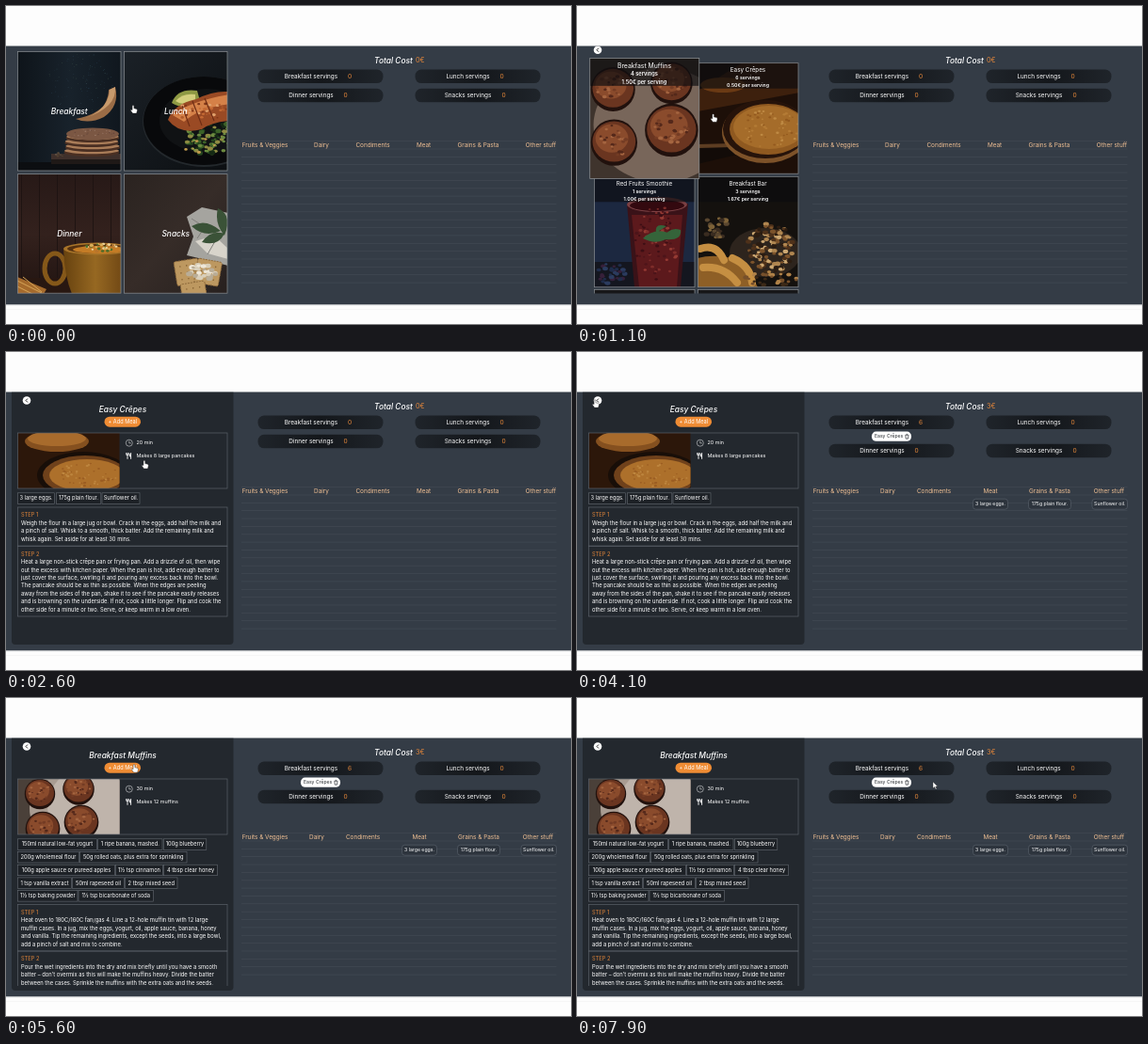
Write an HTML page that moves like this. It is 600 px wide and 338 px high and loops after 8 s.

```html
<!DOCTYPE html>
<html lang="en">
<head>
<meta charset="utf-8">
<title>Meal planner</title>
<style>
html, body { margin: 0; width: 100%; height: 100%; overflow: hidden; background: #fdfdfd; }
#stage { display: block; width: 100vw; height: 100vh; font-family: Inter, "Open Sans", sans-serif; }
</style>
</head>
<body>
<svg id="stage" viewBox="0 0 600 338"></svg>
<script>
const LOOP = 8000;
const ORANGE = '#e5873a';
const TAN = '#efbf93';

// Drawing helpers
const rect = (x, y, w, h, fill, more = '') =>
  `<rect x="${x}" y="${y}" width="${w}" height="${h}" fill="${fill}" ${more}/>`;
const oval = (x, y, rx, ry, fill, more = '') =>
  `<ellipse cx="${x}" cy="${y}" rx="${rx}" ry="${ry}" fill="${fill}" ${more}/>`;
const path = (d, fill, more = '') => `<path d="${d}" fill="${fill}" ${more}/>`;
const group = (id, body, more = '') => `<g id="${id}" ${more}>${body}</g>`;
const text = (s, x, y, size, fill = '#fff', more = 'text-anchor="middle"') =>
  `<text x="${x}" y="${y + size * 0.34}" font-size="${size}" fill="${fill}" ${more}>${s.replace('&', '&amp;')}</text>`;
const startText = (s, x, y, size, fill) => text(s, x, y, size, fill, '');
const title = (s, x, y) => text(s, x, y, 8.4, '#fff', 'text-anchor="middle" font-style="italic" font-weight="500"');
const frame = (x, y, w, h, color = '#5a6068') =>
  rect(x, y, w, h, 'none', `stroke="${color}" stroke-width=".7"`);
const photo = (x, y, w, h, body) =>
  `<svg x="${x}" y="${y}" width="${w}" height="${h}" viewBox="${x} ${y} ${w} ${h}">${body}</svg>`;
const gradient = (id, stops, x2 = 1, y2 = 0) =>
  `<linearGradient id="${id}" x2="${x2}" y2="${y2}">${stops.map((c, i) =>
    `<stop offset="${i / (stops.length - 1)}" stop-color="${c}"/>`).join('')}</linearGradient>`;

let seed = 7;
const random = () => (seed = (seed * 16807) % 2147483647) / 2147483647;
function scatter(n, x, y, rx, ry, size, colors) {
  let out = '';
  for (let i = 0; i < n; i++) {
    const a = random() * 6.283, d = Math.sqrt(random());
    const s = size * (0.6 + random() * 0.6);
    out += oval((x + Math.cos(a) * d * rx).toFixed(1), (y + Math.sin(a) * d * ry).toFixed(1),
      s.toFixed(2), (s * 0.75).toFixed(2), colors[i % colors.length]);
  }
  return out;
}

// Food pictures
function pancakes() {
  let s = rect(12, 48, 111, 128, 'url(#night)') +
    scatter(110, 78, 82, 36, 34, 0.35, ['#31506a', '#3c6272', '#4d6553']) +
    path('M116 86Q121 106 104 118Q88 126 74 120Q98 115 105 104Q109 96 109 89Z', '#9a6c46') +
    path('M116 86Q118 108 84 119Q101 113 107 101Q110 95 110 89Z', '#c89a6c') +
    rect(12, 166, 111, 10, '#0c0e11') + rect(48, 157, 75, 9, '#3f302b') + rect(48, 163, 75, 5, '#1f1917');
  for (let i = 0; i < 4; i++)
    s += oval(91 + i % 2, 155.5 - i * 5, 29.5 - i * 0.4, 4.6, '#4a2f22') + oval(91 + i % 2, 153.8 - i * 5, 29 - i * 0.4, 3.4, '#a97c58');
  return s + oval(92, 136, 28, 6.6, '#7b5743') + scatter(26, 92, 135, 23, 4, 0.8, ['#977765', '#66463a']) +
    scatter(8, 57, 158, 6, 2, 1.2, ['#51402f', '#5f4f42']);
}
function salmon() {
  return rect(125, 48, 111, 128, 'url(#slate)') +
    oval(210, 123, 65, 48, '#23282c') + oval(210, 122, 64, 47, '#08090b') + oval(213, 122, 50, 34, '#101214') +
    path('M176 103Q182 87 203 90L206 101Q190 112 176 103Z', '#8f9a44') +
    path('M180 101Q188 92 201 94L201 101Q188 107 180 101Z', '#d3cf7c') +
    scatter(100, 216, 138, 27, 20, 2.6, ['#24441f', '#3b6128', '#152a14', '#6c8a40', '#8f8a42']) +
    path('M172 121Q178 104 202 99Q228 86 250 94L250 122Q222 121 208 131Q184 137 172 121Z', '#9a4a24') +
    path('M177 116Q195 101 238 94L238 104Q205 108 189 123Z', '#d58148') +
    scatter(40, 208, 113, 28, 11, 1.8, ['#c56a34', '#7f3517', '#e0a06a', '#b05a2b']) +
    path('M187 106l8 22M198 101l10 26M211 98l10 24', 'none', 'stroke="#6f2d15" stroke-width="1.2"') +
    scatter(16, 205, 148, 18, 8, 1.6, ['#c09a4c', '#6d9040']);
}
function soup() {
  let s = rect(12, 179, 111, 127, 'url(#wood)');
  for (let i = 0; i < 6; i++) s += rect(16 + i * 19, 179, 0.9, 127, '#1e1412');
  return s + rect(12, 289, 111, 18, '#281711') + path('M12 288L43 301L40 306H12Z', '#a56a2c') +
    path('M12 292l26 13M12 298l16 8M18 288l20 16', 'none', 'stroke="#d6a558"') +
    oval(52, 279, 11, 16, 'none', 'stroke="#855819" stroke-width="5"') +
    path('M61 258L129 258L125 306H70Q62 287 61 258Z', 'url(#mug)') +
    oval(97, 258, 36, 6.5, '#a87429') + oval(98, 258, 33, 5, '#54300f') + oval(100, 259, 29, 4, '#c47c26') +
    scatter(34, 103, 257, 20, 4.5, 1.9, ['#d8ae5a', '#4c6c29', '#ead39a', '#b9752b']);
}
function cracker(x, y, turn) {
  let dots = '';
  for (let i = 0; i < 9; i++) dots += oval(6 + i % 3 * 7, 6 + Math.floor(i / 3) * 7, 0.8, 0.8, '#8a6636');
  return `<g transform="translate(${x} ${y}) rotate(${turn})">${rect(0, 0, 26, 26, '#bd9860',
    'rx="2" stroke="#8f6b3c" stroke-dasharray="2 1"')}${dots}</g>`;
}
function snack() {
  return rect(125, 179, 111, 127, 'url(#cocoa)') +
    path('M192 224L208 214L236 220V276L213 270L192 265L199 245Z', '#a5a49f') +
    path('M201 250L221 244L236 258V269L214 263Z', '#d8d4cb') +
    path('M197 226l14 9-8 12M222 250l-8 14', 'none', 'stroke="#7f7e7a"') +
    path('M197 234Q212 225 228 239Q211 247 197 234ZM225 215Q241 222 232 244Q221 231 225 215ZM208 251Q218 237 232 242Q225 256 208 251Z', '#3a5237') +
    cracker(178, 272, -9) + cracker(204, 268, 10) + cracker(185, 296, -9) +
    scatter(30, 208, 283, 15, 8, 3, ['#d9cfba', '#eee7d8', '#b9ad97']);
}
const muffin = (x, y, r) => oval(x, y + 1, r * 1.08, r * 1.08, '#21110d') + oval(x, y, r, r * 0.94, '#6a3520') +
  oval(x - r * 0.1, y - r * 0.15, r * 0.76, r * 0.66, '#8a4b2c') +
  scatter(26, x, y, r * 0.8, r * 0.75, r * 0.09, ['#54281a', '#a56540', '#743c24']);
const muffinCard = () => rect(18, 60, 107, 120, '#3f342d') + oval(88, 126, 66, 56, '#78665a') +
  muffin(41, 90, 20) + muffin(98, 84, 19) + muffin(42, 142, 21) + muffin(98, 130, 24);
const crepeCard = () => rect(128, 60, 108, 120, '#1d0f08') + path('M128 90L176 60H236V92L128 112Z', '#3d200d') +
  oval(155, 84, 24, 8, '#6b3a14') +
  path('M128 147L166 146L174 156L128 164Z', '#5d3d22') + path('M128 151L166 150L170 158L128 168Z', '#120b08') +
  oval(200, 134, 46, 33, '#7d5229') + oval(200, 131, 45, 31, '#26130a') + oval(203, 131, 41, 27, '#8f5920') +
  oval(204, 129, 38, 23, '#a56c2a') + scatter(60, 204, 130, 33, 20, 1.4, ['#b47b35', '#93591e', '#bf8a44']);
const smoothieCard = () => rect(18, 181, 107, 118, '#1c2840') + rect(18, 272, 107, 28, '#14161f') +
  path('M53 210H118L110 299H61Z', '#3a1218') + path('M58 222H112L106 299H66Z', '#5c191c') +
  oval(85, 211, 32, 8, '#7b4043') + oval(85, 212, 29, 6, '#33090f') +
  scatter(80, 85, 252, 23, 40, 1.8, ['#7f2d2a', '#3d0e14', '#953a33', '#4d1419']) +
  path('M70 247Q84 234 101 243Q87 256 70 247ZM92 248Q97 234 110 238Q112 250 92 248ZM84 241Q82 230 95 234Z', '#35643a') +
  scatter(30, 35, 284, 16, 12, 2.5, ['#1f2c4a', '#36203a', '#2b3b5e']);
const barCard = () => rect(128, 181, 108, 119, '#14110e') + oval(200, 262, 38, 26, '#2d241d') +
  scatter(24, 147, 236, 15, 12, 3, ['#3a2c20', '#59462f', '#7d6238']) +
  scatter(120, 206, 257, 25, 26, 2.6, ['#7c532b', '#b08650', '#4e311a', '#cda872', '#2b1c11']) +
  path('M128 268Q150 262 178 272L192 299H128Z', '#8e5f26') +
  path('M131 258Q148 252 156 270M134 278Q156 276 170 294M165 268Q184 276 186 294', 'none', 'stroke="#c58f42" stroke-width="8" stroke-linecap="round"') +
  scatter(30, 206, 290, 28, 8, 2.6, ['#77502b', '#b08248', '#3c2917']);
const muffinWide = () => rect(12, 86, 109, 60, '#4a4039') + oval(85, 117, 60, 55, '#a99c92') + oval(88, 116, 44, 43, '#bfb4ab') +
  muffin(36, 101, 15) + muffin(77, 96, 15.5) + muffin(39, 138, 17) + muffin(80, 131, 17);
const crepeWide = () => rect(12, 86, 109, 60, '#2c170a') + oval(54, 95, 34, 11, '#85501f') + oval(54, 92, 31, 8, '#a86b2c') +
  oval(82, 131, 49, 25, '#180e08') + oval(84, 131, 45, 21, '#6f411b') + oval(86, 131, 40, 17, '#ad702b') +
  scatter(55, 86, 131, 33, 13, 1.4, ['#be863f', '#9b5d22']);

// Left side
const homeCard = (id, name, x, y, art) => group(id,
  photo(x, y, 109.5, 126.5, art()) + frame(x, y, 109.5, 126.5, '#8b8f93') +
  title(name, x + 54.8, y + 63.3), 'class="card"');

function listCard(id, name, servings, price, x, y, art) {
  const mid = x + 53;
  const line = (s, dy) => text(s, mid, y + dy, 5.2, '#fff', 'text-anchor="middle" font-weight="600"');
  return group(id, photo(x, y, 106.5, 117.5, art()) + rect(x, y, 106.5, 27, '#0d0d10', 'opacity=".68"') +
    frame(x, y, 106.5, 117.5, '#8b8f93') + text(name, mid, y + 7.3, 6.3) +
    line(`${servings} servings`, 15.7) + line(`${price}€ per serving`, 23.5), 'class="card"');
}

const backButton = y => oval(22, y, 4.3, 4.3, '#fff') +
  path(`M23 ${y - 2}l-2 2l2 2`, 'none', 'stroke="#222" stroke-width="1"');

const ingredient = y => ([label, x, w]) =>
  rect(x, y, w, 11.5, '#1d2126', 'stroke="#666c73" stroke-width=".6"') + text(label, x + w / 2, y + 5.7, 5.7);

function step(n, y, h, lines) {
  return frame(12.5, y, 222.5, h) + startText(`STEP ${n}`, 16, y + 8.4, 5.7, ORANGE) +
    lines.map((s, i) => startText(s, 16, y + 17 + i * 8.4, 5.8)).join('');
}

function recipe(id, name, art, minutes, makes, rows, steps) {
  const rowsHtml = rows.map((row, i) => row.map(ingredient(149.8 + i * 13.7)).join('')).join('');
  let y = 151.4 + rows.length * 13.6, stepsHtml = '';
  steps.forEach((lines, i) => {
    const h = 16 + lines.length * 8.4;
    stepsHtml += step(i + 1, y, h, lines);
    y += h;
  });
  return group(id, path('M6 42.5H241.5V307q0 4-4 4H10q-4 0-4-4Z', '#23282e') + backButton(51.5) + title(name, 124, 61.3) +
    rect(104.5, 68.7, 38.5, 11, '#ef8c34', 'rx="5.5"') + text('+ Add Meal', 123.8, 74.2, 5.6) +
    photo(12.5, 86, 108, 59, art()) + frame(12.5, 86, 222.5, 59) +
    oval(130.8, 96.7, 3.5, 3.5, 'none', 'stroke="#d5d7d9" stroke-width=".6"') +
    path('M130.8 94.5v2.4h2', 'none', 'stroke="#d5d7d9" stroke-width=".6"') +
    path('M129 107.2v6.6M127.8 107v2.4h2.4V107M132.6 113.8v-6.4q-1.4 1-1.2 3.6h1.2', 'none', 'stroke="#fff" stroke-width=".9"') +
    startText(`${minutes} min`, 138.5, 96.5, 5.4) + startText(makes, 138.5, 110.4, 5.4) +
    photo(6, 148, 236, 158, rowsHtml + stepsHtml));
}

// Right side
const pill = (label, n, x, y, labelX, numberX) => rect(x, y, 133, 14.5, 'url(#pill)', 'rx="6.5"') +
  text(label, labelX, y + 7.3, 6.4) + text(String(n), numberX, y + 7.3, 6.6, ORANGE);

const mealTag = ([name, x, w]) => rect(x, 84.6, w, 10.2, '#fff', 'rx="4.6"') + startText(name, x + 3, 89.7, 5.1, '#25292e') +
  path(`M${x + w - 6.6} 88.3h4M${x + w - 6.1} 88.7l.4 3.5h2.2l.4-3.5M${x + w - 5.3} 87.4h1.4`, 'none', 'stroke="#25292e" stroke-width=".7"');

const CATEGORIES = ['Fruits & Veggies', 'Dairy', 'Condiments', 'Meat', 'Grains & Pasta', 'Other stuff'];

function column([x, w, ...items]) {
  let y = 156.2;
  return items.map(item => {
    const lines = item.split('|'), h = 3 + lines.length * 8;
    const out = rect(x, y, w, h, '#2d343d', 'rx="3" stroke="#5d656f" stroke-width=".6"') +
      lines.map((s, i) => text(s, x + w / 2, y + 5.4 + i * 7.9, 5.2)).join('');
    y += h + 1.25;
    return out;
  }).join('');
}

function plan(id, cost, servings, tags, centers, columns) {
  const y2 = tags.length ? 97.7 : 87.8;
  return group(id, startText(cost + '€', 435, 57.5, 7.3, ORANGE) +
    pill('Breakfast servings', servings, 267.5, 67.6, 324, 365) + pill('Lunch servings', 0, 434.5, 67.6, 490.5, 526.5) +
    pill('Dinner servings', 0, 267.5, y2, 324, 360.5) + pill('Snacks servings', 0, 434.5, y2, 490.5, 528.5) +
    tags.map(mealTag).join('') + CATEGORIES.map((c, i) => text(c, centers[i], 147.9, 6.4, TAN)).join('') +
    columns.map(column).join(''));
}

let ruled = '';
for (let i = 0; i < 19; i++) ruled += rect(250, (143.3 + i * 8.36).toFixed(1), 334.5, 0.6, '#434b55');

const sliver = x => rect(x, 301.5, 106.5, 6, '#171719', 'stroke="#8b8f93" stroke-width=".7"');

document.getElementById('stage').innerHTML =
  '<defs>' + gradient('night', ['#0e141a', '#18222b', '#10171e']) + gradient('slate', ['#1b2127', '#0c0f12'], 1, 1) +
  gradient('wood', ['#271917', '#33211d', '#211411'], 0, 1) + gradient('mug', ['#67420f', '#966822', '#6a4212']) +
  gradient('cocoa', ['#2a2320', '#362c28', '#27201e'], 1, 1) + gradient('pill', ['#1f242a', '#14171b', '#1f242a']) +
  gradient('fade', ['#d5d7d9', '#fdfdfd'], 0, 1) + '</defs>' +
  rect(0, 0, 600, 338, '#fdfdfd') + rect(0, 42.5, 600, 275, '#343c46') + rect(0, 317.5, 600, 1.5, 'url(#fade)') +
  rect(0, 322, 600, 0.6, '#f1f1f2') + ruled + title('Total Cost', 411.5, 58.2) +
  plan('plan0', 0, 0, [], [275, 335, 389.5, 443.5, 501.5, 568], []) +
  plan('plan1', 3, 6, [['Easy Crêpes', 313, 42]], [275, 330, 379, 439, 502, 565],
    [[420.5, 37, '3 large eggs.'], [479.5, 45, '175g plain flour.'], [547, 37.5, 'Sunflower oil.']]) +
  plan('plan2', 9, 10, [['Easy Crêpes', 285, 42], ['Breakfast Muffins', 328.5, 54]], [280, 339, 398, 447, 495.5, 555.5], [
    [250.5, 57.5, '1 ripe banana,|mashed.', '100g blueberry'],
    [309.5, 59, '150ml natural low-fat|yogurt'],
    [370, 56.5, '100g apple sauce or|pureed apples', '1½ tsp cinnamon', '4 tbsp clear honey', '1 tsp vanilla extract'],
    [428, 38, '3 large|eggs.'],
    [468, 56, '175g plain flour.', '200g wholemeal|flour', '50g rolled oats, plus|extra for sprinkling'],
    [526, 58.5, 'Sunflower oil.', '50ml rapeseed oil', '2 tbsp mixed seed', '1½ tsp baking powder', '1½ tsp bicarbonate of|soda']
  ]) +
  photo(0, 42.5, 250, 275,
    group('home', homeCard('lunch', 'Lunch', 125.5, 48.5, salmon) + homeCard('dinner', 'Dinner', 12.5, 178.7, soup) +
      homeCard('snacks', 'Snacks', 125.5, 178.7, snack) + homeCard('breakfast', 'Breakfast', 12.5, 48.5, pancakes)) +
    group('list', backButton(46.7) + photo(0, 42, 250, 263.5, sliver(18.5) + sliver(128.5) +
      group('cards', listCard('smoothie', 'Red Fruits Smoothie', 1, '1.00', 18.5, 181.3, smoothieCard) +
        listCard('bar', 'Breakfast Bar', 3, '1.67', 128.5, 181.3, barCard) +
        listCard('muffins', 'Breakfast Muffins', 4, '1.50', 18.5, 60.7, muffinCard) +
        listCard('crepes', 'Easy Crêpes', 6, '0.50', 128.5, 60.7, crepeCard)))) +
    recipe('crepeRecipe', 'Easy Crêpes', crepeWide, 20, 'Makes 8 large pancakes',
      [[['3 large eggs.', 12.5, 39], ['175g plain flour.', 53.3, 47.5], ['Sunflower oil.', 102, 40]]], [
        ['Weigh the flour in a large jug or bowl. Crack in the eggs, add half the milk and',
          'a pinch of salt. Whisk to a smooth, thick batter. Add the remaining milk and',
          'whisk again. Set aside for at least 30 mins.'],
        ['Heat a large non-stick crêpe pan or frying pan. Add a drizzle of oil, then wipe',
          'out the excess with kitchen paper. When the pan is hot, add enough batter to',
          'just cover the surface, swirling it and pouring any excess back into the bowl.',
          'The pancake should be as thin as possible. When the edges are peeling',
          'away from the sides of the pan, shake it to see if the pancake easily releases',
          'and is browning on the underside. If not, cook a little longer. Flip and cook the',
          'other side for a minute or two. Serve, or keep warm in a low oven.']]) +
    recipe('muffinRecipe', 'Breakfast Muffins', muffinWide, 30, 'Makes 12 muffins', [
      [['150ml natural low-fat yogurt', 12.5, 84], ['1 ripe banana, mashed.', 97.7, 68.3], ['100g blueberry', 167.3, 45.5]],
      [['200g wholemeal flour', 12.5, 65], ['50g rolled oats, plus extra for sprinkling', 78.5, 113.5]],
      [['100g apple sauce or pureed apples', 12.5, 103], ['1½ tsp cinnamon', 116.5, 50], ['4 tbsp clear honey', 167.5, 57]],
      [['1 tsp vanilla extract', 12.5, 57], ['50ml rapeseed oil', 70.5, 55], ['2 tbsp mixed seed', 126.5, 55.5]],
      [['1½ tsp baking powder', 12.5, 63.5], ['1½ tsp bicarbonate of soda', 77, 79.5]]], [
        ['Heat oven to 180C/160C fan/gas 4. Line a 12-hole muffin tin with 12 large',
          'muffin cases. In a jug, mix the eggs, yogurt, oil, apple sauce, banana, honey',
          'and vanilla. Tip the remaining ingredients, except the seeds, into a large bowl,',
          'add a pinch of salt and mix to combine.'],
        ['Pour the wet ingredients into the dry and mix briefly until you have a smooth',
          'batter – don’t overmix as this will make the muffins heavy. Divide the batter',
          'between the cases. Sprinkle the muffins with the extra oats and the seeds.']])) +
  group('cursor', group('hand', path('M-1.9-4q.9-.9 1.8 0v2.8l2.6.6q1.1.4.9 1.7l-.8 3h-4l-2.2-3q0-1.2 1.7-.5z', '#fff')) +
    group('arrow', path('M-2-4v7l1.7-1.5 1.2 2.6 1.1-.5-1.2-2.5h2.2z', '#fff')), 'stroke="#222" stroke-width=".4"');

// Motion
const SCENES = [[0, 'home'], [800, 'list'], [1800, 'crepeRecipe'], [4200, 'list'], [4600, 'muffinRecipe']];
const PLANS = [[0, 'plan0'], [3200, 'plan1'], [5900, 'plan2'], [7800, 'plan1']];
const HOVERS = [['breakfast', 150, 900], ['muffins', 880, 1100], ['crepes', 1100, 1900], ['muffins', 4340, 4700]];
const CURSOR = [[0, 136, 110], [100, 136, 110], [380, 114, 128], [850, 114, 128], [1300, 168, 113], [1900, 168, 113],
  [2500, 150, 125], [3000, 130, 76], [3400, 130, 76], [4000, 20, 55], [4220, 20, 55], [4450, 78, 112], [4600, 78, 112],
  [4690, 137, 75], [5950, 137, 75], [6450, 348, 157], [6900, 348, 157], [7350, 378, 91], [7560, 378, 91], [7600, 380, 93]];

const byId = id => document.getElementById(id);
const clamp = v => Math.max(0, Math.min(1, v));
const ease = v => v * v * (3 - 2 * v);
const show = (id, on) => { byId(id).style.display = on ? '' : 'none'; };
const cards = [...document.querySelectorAll('.card')].map(node => {
  const size = name => +node.querySelector('svg').getAttribute(name);
  return { node, x: size('x') + size('width') / 2, y: size('y') + size('height') / 2 };
});

function switchTo(steps, t) {
  const active = steps.filter(s => s[0] <= t).pop()[1];
  for (const id of new Set(steps.map(s => s[1]))) show(id, id === active);
}
function cursorAt(t) {
  const next = CURSOR.findIndex(k => k[0] > t);
  if (next < 0) return CURSOR[CURSOR.length - 1].slice(1);
  const [t0, x0, y0] = CURSOR[next - 1], [t1, x1, y1] = CURSOR[next];
  const p = ease((t - t0) / (t1 - t0));
  return [x0 + (x1 - x0) * p, y0 + (y1 - y0) * p];
}

function draw(t) {
  switchTo(SCENES, t);
  switchTo(PLANS, t);
  for (const { node, x, y } of cards) {
    let grow = 0;
    for (const [id, from, to] of HOVERS)
      if (id === node.id) grow = Math.max(grow, ease(clamp((t - from) / 200)) * (1 - ease(clamp((t - to) / 200))));
    const k = 1 + 0.09 * grow;
    node.setAttribute('transform', `translate(${x} ${y}) scale(${k}) translate(${-x} ${-y})`);
    if (grow > 0.5 && node.parentNode.lastChild !== node) node.parentNode.append(node);
  }
  const [x, y] = cursorAt(t);
  byId('cursor').setAttribute('transform', `translate(${x} ${y})`);
  const pointing = x < 242 || (t > 7300 && t < 7800);
  show('hand', pointing);
  show('arrow', !pointing);
}

const began = performance.now();
function tick() {
  draw((performance.now() - began) % LOOP);
  requestAnimationFrame(tick);
}
tick();
</script>
</body>
</html>
```
